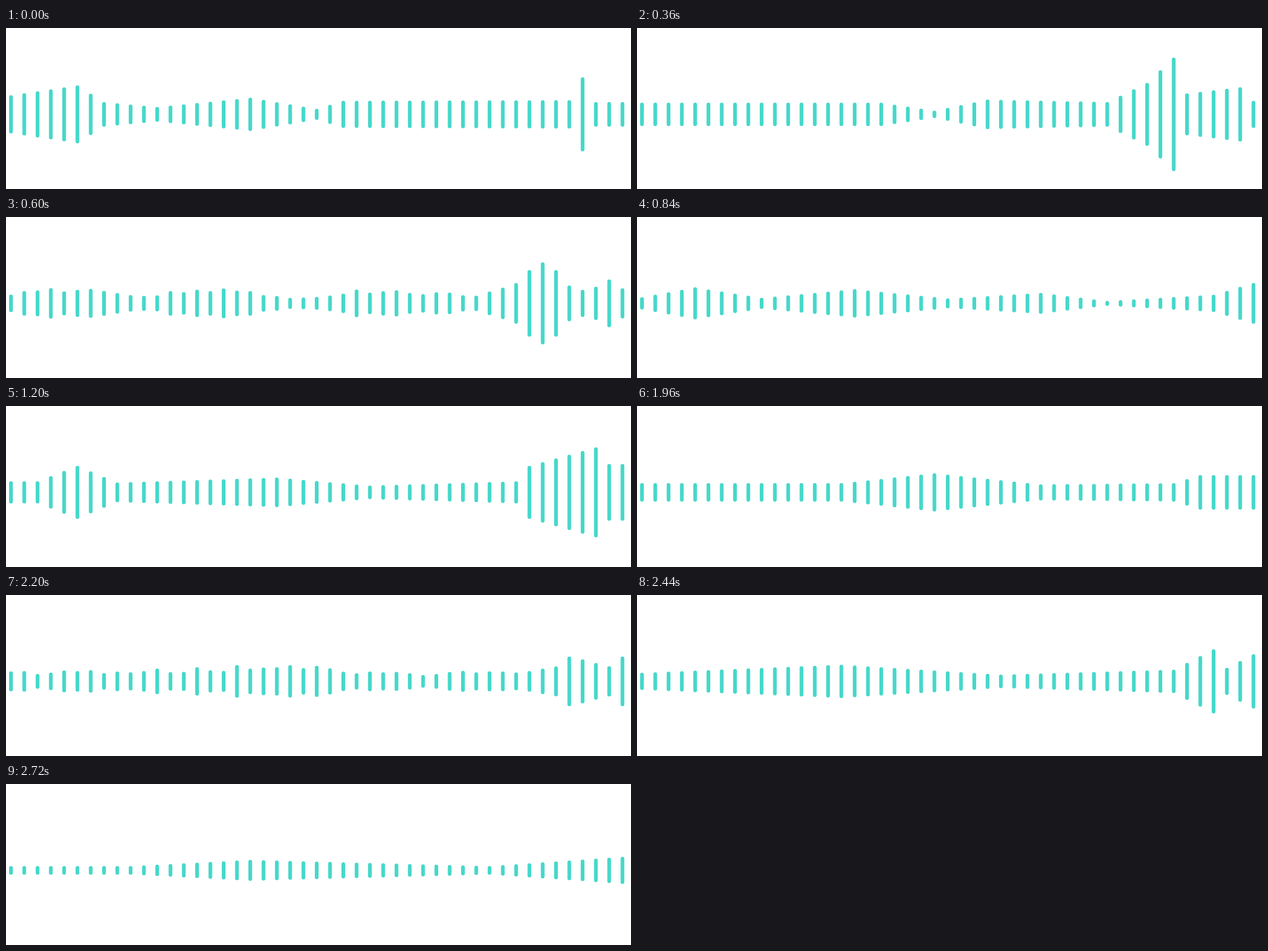
Animation, 1008 px wide and 261 px high, one loop 2760 ms. Source, as an HTML page with a canvas:

```html
<!DOCTYPE html>
<html lang="en">
<head>
<meta charset="utf-8">
<title>Audio spectrum</title>
<style>
  html, body { margin: 0; width: 100%; height: 100%; overflow: hidden; background: #fff; }
  canvas { display: block; }
</style>
</head>
<body>
<canvas id="stage" width="1008" height="261"></canvas>
<script>
const ctx = document.getElementById('stage').getContext('2d');
const LOOP = 2760, STEP = 40, BARS = 47, MID = 140;

// Each pose: a time, and the spectrum's outline as bar, half height, ...
const poses = [
  [0, [0,31, 5,47, 7,20, 11,12, 18,27, 23,9, 25,22, 42,23, 43,60, 44,20]],
  [360, [18,19, 22,6, 26,24, 35,20, 38,51, 40,92, 41,34, 45,44, 46,22]],
  [840, [0,10, 4,26, 9,9, 16,23, 23,8, 30,17, 35,4, 43,14, 46,33]],
  [1200, [2,18, 5,43, 8,16, 20,24, 27,11, 38,18, 39,43, 44,73, 45,46]],
  [1960, [15,15, 22,31, 30,13, 40,15, 42,28]],
  [2440, [0,14, 15,27, 27,11, 40,19, 43,52, 44,22, 46,44]],
  [2720, [9,7, 18,17, 36,7, 46,22]]
];

// Short bursts near the right end: time, half height
const bursts = [[200, 140], [640, 126], [1480, 102], [1760, 103], [2320, 79]];

const mix = (a, b, u) => a + (b - a) * u;
const bell = x => Math.exp(-x * x);

function noise(n) {
  const s = Math.sin(n * 12.9898) * 43758.5453;
  return (s - Math.floor(s)) * 2 - 1;
}

// Straight between the points, level outside them
function outline(points, bar) {
  let k = 0;
  while (k < points.length - 4 && bar > points[k + 2]) k += 2;
  const [x0, h0, x1, h1] = points.slice(k, k + 4);
  const u = (bar - x0) / (x1 - x0);
  return mix(h0, h1, Math.min(1, Math.max(0, u)));
}

function halfHeight(bar, t) {
  let k = 0;
  while (k < poses.length - 2 && t >= poses[k + 1][0]) k++;
  const [t0, from] = poses[k], [t1, to] = poses[k + 1];
  const u = (t - t0) / (t1 - t0);
  const flicker = 1 + 0.25 * Math.sin(Math.PI * u) * noise(bar + t / STEP * 61);
  let h = mix(outline(from, bar), outline(to, bar), u) * flicker;
  for (const [at, peak] of bursts) {
    h = Math.max(h, peak * bell((t - at) / 50) * bell((bar - 40) / 2.2));
  }
  return Math.max(2, h);
}

function draw(now) {
  const t = Math.floor(now % LOOP / STEP) * STEP;
  ctx.clearRect(0, 0, 1008, 261);
  ctx.fillStyle = '#45d8ca';
  ctx.beginPath();
  for (let i = 0; i < BARS; i++) {
    const h = halfHeight(i, t);
    ctx.roundRect(5 + i * 21.44, MID - h, 6, 2 * h, Math.min(3, h));
  }
  ctx.fill();
}

const start = performance.now();
function tick() {
  draw(performance.now() - start);
  requestAnimationFrame(tick);
}
tick();
</script>
</body>
</html>
```
